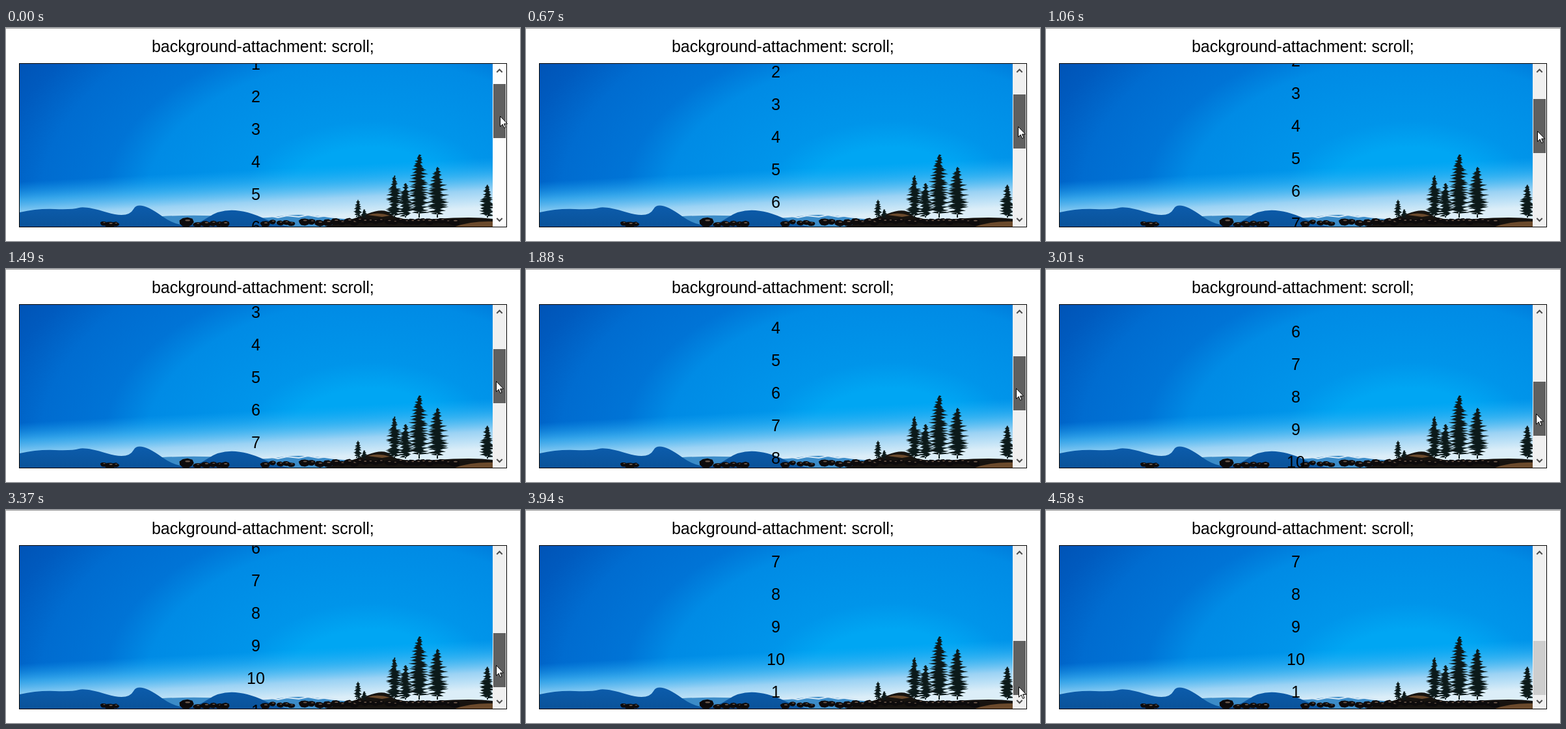
An HTML page that plays this animation: 790 by 327 pixels, repeating every 4.88 s.

```html
<!DOCTYPE html>
<html lang="en">
<head>
<meta charset="utf-8">
<title>background-attachment: scroll</title>
<style>
  html, body { margin: 0; width: 100%; height: 100%; overflow: hidden; background: #fff; }
  svg { display: block; width: 790px; height: 327px; }
  text { font: 25px "Liberation Sans", Arial, sans-serif; text-anchor: middle; fill: #000; }
</style>
</head>
<body>
<svg viewBox="0 0 790 327">
  <defs>
    <radialGradient id="sky" gradientUnits="userSpaceOnUse" cx="0" cy="0" r="650"
      gradientTransform="translate(560 265) scale(1 .625)">
      <stop offset=".2" stop-color="#00a6f3"/>
      <stop offset=".3" stop-color="#0095ea"/>
      <stop offset=".53" stop-color="#008be5"/>
      <stop offset=".63" stop-color="#0074d6"/>
      <stop offset=".78" stop-color="#006cd0"/>
      <stop offset=".9" stop-color="#005abe"/>
      <stop offset="1" stop-color="#0052b4"/>
    </radialGradient>
    <linearGradient id="haze" gradientUnits="userSpaceOnUse" x1="560" y1="208" x2="564" y2="285">
      <stop offset="0" stop-color="#20acf4" stop-opacity="0"/>
      <stop offset=".35" stop-color="#48b8f2" stop-opacity=".75"/>
      <stop offset=".65" stop-color="#9ad2f4"/>
      <stop offset="1" stop-color="#dceef8"/>
    </linearGradient>
    <linearGradient id="hill" x1="0" y1="0" x2="0" y2="1">
      <stop offset="0" stop-color="#0c5cac"/>
      <stop offset="1" stop-color="#0a5298"/>
    </linearGradient>
    <clipPath id="view"><rect x="21" y="55" width="727" height="250"/></clipPath>
  </defs>

  <rect width="790" height="1" fill="#a0a0a0"/>
  <text x="394.9" y="37">background-attachment: scroll;</text>

  <g clip-path="url(#view)">
    <g id="photo">
      <rect x="21" y="55" width="727" height="250" fill="url(#sky)"/>
      <rect x="21" y="200" width="727" height="105" fill="url(#haze)"/>
      <path fill="#3c8cc8" d="M240 289Q300 286 345 290T420 289T490 290T560 292V305H240Z"/>
      <path fill="none" stroke="#d4e8f6" stroke-width="2" d="M350 290l12 1 14-3 16 3 12-3 14 3 14-3 18 2 14-3 16 3 14-2 16 3"/>
      <path fill="url(#hill)" d="M21 283Q48 277 75 278T112 276T155 283T196 278T240 289T310 291T400 294T560 295V305H21Z"/>
      <path fill="#17130f" d="M490 305Q530 295 556 285T592 286T660 293T748 293V305Z"/>
      <path fill="#6b4a2c" d="M690 305Q715 296 748 297V305ZM556 287q16-5 34 1l-12 2Z"/>
    </g>
    <g id="list"></g>
  </g>

  <rect id="track" x="748" y="55" width="21" height="250"/>
  <rect id="button" x="749" y="285" width="19" height="19" fill="#dadada"/>
  <rect id="thumb" x="749" width="19" height="83"/>
  <path d="M754.3 68l4.2-4.2 4.2 4.2M754.3 292l4.2 4.2 4.2-4.2" fill="none" stroke="#505050" stroke-width="2.1"/>
  <rect x="20.5" y="54.5" width="749" height="251" fill="none" stroke="#000"/>
  <path id="cursor" d="M.5.5V16.3L4.2 12.8 6.7 18.5 9 17.5 6.6 12H11.6Z" fill="#fff" stroke="#000"/>
</svg>

<script>
const $ = id => document.getElementById(id);

function add(parent, tag, attrs) {
  const el = document.createElementNS("http://www.w3.org/2000/svg", tag);
  for (const k in attrs) el.setAttribute(k, attrs[k]);
  parent.append(el);
  return el;
}

let seed = 11;
const rnd = () => (seed = seed * 16807 % 2147483647) / 2147483647;

// Uneven dark boulder with a lit top
function rock(x, y, r) {
  let d = "";
  for (let i = 0; i < 9; i++) {
    const a = i / 9 * 2 * Math.PI, k = r * (.85 + rnd() * .3);
    d += (i ? "L" : "M") + (x + Math.cos(a) * k).toFixed(1) + " " + (y + Math.sin(a) * k * .65).toFixed(1);
  }
  add($("photo"), "path", { d: d + "Z", fill: "#0d0b0c" });
  add($("photo"), "ellipse", { cx: x + r * .2, cy: y - r * .25, rx: r * .35, ry: r * .12, fill: "#6e5a4c" });
}

function rocks(from, to, top) {
  for (let x = from; x < to; x += 7 + rnd() * 6) {
    const r = 5 + rnd() * 4;
    rock(x, top + r * .65 + rnd() * 4, r);
  }
}

// Conifer: trunk plus ragged branches, widest below the middle
function pine(x, top, half) {
  const base = 291, foot = base - (base - top) * .08;
  let d = `M${x - 1} ${base}L${x} ${top}L${x + 1} ${base}Z`;
  for (let y = top + 2; y < foot; y += 2.2) {
    const k = (y - top) / (foot - top);
    const reach = half * (.15 + .85 * Math.sin(Math.PI * .7 * k));
    for (const side of [-1, 1]) {
      const w = side * reach * (.45 + rnd() * .75);
      d += `M${x} ${y - 2}L${(x + w).toFixed(1)} ${(y + rnd() * 4 - 1).toFixed(1)}L${x} ${y + 3}Z`;
    }
  }
  add($("photo"), "path", { d, fill: "#0c1a1a" });
}

[[597, 226, 12], [614, 238, 12], [635, 194, 17], [663, 213, 16],
 [740, 240, 12], [541, 263, 6], [550, 278, 5]].forEach(p => pine(...p));

rock(277, 298, 11);
rocks(150, 172, 296);
rocks(294, 345, 294);
rocks(398, 440, 294);
rocks(458, 690, 291);

for (let i = 0; i < 12; i++)
  add($("list"), "text", { x: 384, y: 64 + 50 * i }).textContent = i % 10 + 1;

const LOOP = 4880, STEP = 134.7;

// Straight lines between [step, value] points
function along(points, i) {
  const n = points.findIndex(p => p[0] >= i);
  if (n < 0) return points.at(-1)[1];
  if (n === 0) return points[0][1];
  const [a, from] = points[n - 1], [b, to] = points[n];
  return Math.round(from + (to - from) * (i - a) / (b - a));
}

const drag = [[0, 0], [5, 16], [11, 37], [14, 48], [17, 67], [18, 70], [19, 70], [25, 103], [27, 115]];
const leave = [[25, 0], [27, 8], [31, 34], [32, 46], [34, 92]];
const sway = [[0, 759], [2, 756], [6, 756], [11, 753], [25, 753], [32, 760]];
const RELEASE = 30;

function draw(t) {
  const i = Math.floor((t % LOOP + 10) / STEP);
  const off = along(drag, i);
  const x = along(sway, i), y = 135 + off + along(leave, i);
  const thumb = i < RELEASE ? "#606060" : y < 285 ? "#a6a6a6" : "#cdcdcd";
  $("list").setAttribute("transform", `translate(0 ${-Math.round(off * 2.4)})`);
  $("thumb").setAttribute("y", 86 + off);
  $("thumb").setAttribute("fill", thumb);
  $("track").setAttribute("fill", i ? "#f0f0f0" : "#fdfdfd");
  $("button").setAttribute("visibility", y >= 285 && y < 304 ? "visible" : "hidden");
  $("cursor").setAttribute("transform", `translate(${x} ${y})`);
}

const start = performance.now();
function tick() {
  draw(performance.now() - start);
  requestAnimationFrame(tick);
}
tick();
</script>
</body>
</html>
```
